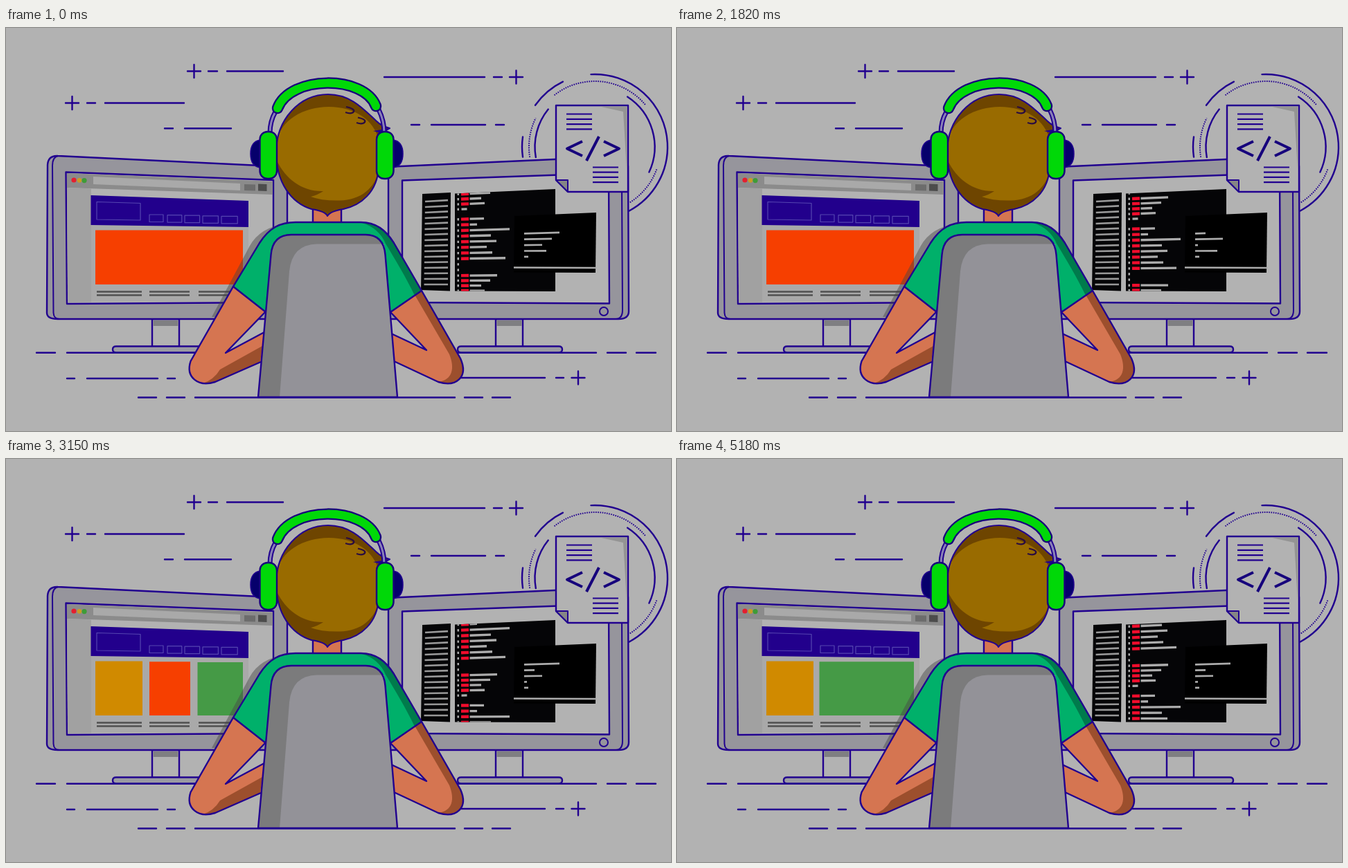
These frames come from a looping animation (960 by 583 pixels, 5240 ms). An HTML page with a canvas:

```html
<!DOCTYPE html>
<html lang="en">
<head>
<meta charset="utf-8">
<title>Programmer at work</title>
<style>
html, body { margin: 0; width: 100%; height: 100%; overflow: hidden; background: #b2b2b2; }
canvas { display: block; }
</style>
</head>
<body>
<canvas id="stage" width="960" height="583"></canvas>
<script>
const ctx = document.getElementById('stage').getContext('2d');
const INK = '#21008f', BG = '#b2b2b2', METAL = '#96959c', TEXT = '#acacac';
const SKIN = '#d57551', TAN = '#9c4f2d', SHIRT = '#00b06a', LIME = '#00d808';
const AMBER = '#d08a00', ORANGE = '#f63f00', GREEN = '#459a46';

function draw(d, fill, line, width = 2.4) {
  const path = new Path2D(d);
  if (fill) { ctx.fillStyle = fill; ctx.fill(path); }
  if (line) { ctx.strokeStyle = line; ctx.lineWidth = width; ctx.stroke(path); }
}

// Horizontal dashes given as start and end pairs.
function dashes(y, ...xs) {
  let d = '';
  for (let i = 0; i < xs.length; i += 2) d += `M${xs[i]},${y}H${xs[i + 1]}`;
  draw(d, null, INK);
}
const plus = (x, y) => draw(`M${x - 9.5},${y}h19M${x},${y - 9.5}v19`, null, INK);

function disc(x, y, r, fill, line) {
  ctx.beginPath();
  ctx.arc(x, y, r, 0, 7);
  if (fill) { ctx.fillStyle = fill; ctx.fill(); }
  if (line) { ctx.strokeStyle = line; ctx.lineWidth = 2; ctx.stroke(); }
}

function ring(r, from, to, dotted) {
  ctx.beginPath();
  ctx.arc(850, 172, r, from * Math.PI / 180, to * Math.PI / 180);
  ctx.setLineDash(dotted ? [1.6, 1.6] : []);
  ctx.lineCap = dotted ? 'butt' : 'round';
  ctx.strokeStyle = INK;
  ctx.lineWidth = dotted ? 2 : 2.4;
  ctx.stroke();
  ctx.setLineDash([]);
  ctx.lineCap = 'round';
}

function scenery() {
  dashes(62.5, 292, 305, 319, 400);
  dashes(108.5, 117, 129, 143, 257);
  dashes(145.3, 229, 241, 258, 325);
  dashes(71, 546, 691, 704, 716);
  dashes(140, 585, 597, 614, 692, 707, 719);
  dashes(469.7, 44, 71, 88, 290, 640, 852, 868, 895, 910, 938);
  dashes(507, 88, 99, 117, 219, 233, 244);
  dashes(506, 640, 778, 794, 805);
  dashes(534.5, 191, 217, 232, 258, 273, 648, 662, 688, 702, 728);
  plus(271.5, 62.5); plus(95.5, 108.5); plus(736.5, 71); plus(826, 506);
  ring(105, -93, 62);
  ring(105, 215, 244);
  ring(105, 172, 188);
  ring(95, 232, 320, true);
  ring(95, 171, 206, true);
  ring(95, 20, 58, true);
  ring(86.5, -57, 25);
  ring(86.5, 170, 219);
}

function stand(x, left, right) {
  draw(`M${x},421h39v40h-39z`, BG, INK);
  draw(`M${x + 1.5},423h36v8h-36z`, '#7f7f82');
  draw(`M${left + 5},460.5H${right - 5}q5,0 5,4.5t-5,4.5H${left + 5}q-5,0 -5,-4.5t5,-4.5z`, '#9b9ba3', INK);
}

function webPage(phase) {
  draw('M86.5,208.5L386,220V397L88,399z', BG, INK);
  draw('M88,210L385,222V241L88,231z', '#8b8b8b');
  draw('M88,231L123,232.5V396.5L89,397z', '#a1a1a1');
  draw('M126,215L338,225V235L126,226z', '#a9a9a9');
  draw('M344,226l16,.6v9l-16,-.6z', '#6c6c6c');
  draw('M364,225.5l12.5,.6v10l-12.5,-.6z', '#4c4c4c');
  disc(98, 220, 3.6, '#e51f2f');
  disc(106, 220.3, 3.4, '#c99b28');
  disc(113, 220.6, 3.6, '#3f9c38');
  draw('M123,242L350,250V396H123z', '#a9a9a9');

  const maroon = phase === 5 || phase === 6;
  const edge = maroon ? '#b4386f' : '#5546b0';
  draw('M122.5,242L350,250V288L122.5,285z', maroon ? '#860036' : '#22008c');
  draw('M131,251.5L194,253.5V278L131,277z', null, edge, 1.2);
  [207, 233, 258, 284, 311].forEach((x, i) =>
    draw(`M${x},${270 + i * .6}h${20 + i * .8}v10.5h${-20 - i * .8}z`, null, edge, 1.2));

  const block = (x, right, fill) => draw(`M${x},${291.2 + x / 100}H${right}V371H${x}z`, fill);
  if (phase > 6 || phase < 1) block(129, 342, ORANGE);
  else {
    block(129, 197, AMBER);
    if (phase < 4) { block(207, 266, ORANGE); block(276.5, 342, GREEN); }
    else block(205.5, 342, GREEN);
  }
  draw('M131,381.5h65M131,386.5h65M207,381.5h58M207,386.5h58M278,381.5h55M278,386.5h55', null, '#505050', 2.3);
}

// Right edge of each code line; 0 is a lone bracket, -1 empty, 1 only a gutter mark.
const CODE = [709, 699, 686, 691, 0, -1, 690, 680, 727, 700, 708, 694, 702, 721, 1, 1];

function bar(x, right, y, tilt, colour, width = 3.3) {
  draw(`M${x},${y + (x - 676) * tilt}L${right},${y + (right - 676) * tilt}`, null, colour, width);
}

function editor(phase) {
  draw('M601,240L642,238L641,380.5L599,379z', '#050507');
  for (let i = 0; i < 16; i++) {
    const y = 251 + i * 8;
    draw(`M${605 - i * .1},${y}L638,${y - 1.8 + i * .12}`, null, '#989898', 2.7);
  }
  const panel = 'M648,239.5L793,233V381L648,380.5z';
  draw(panel, '#050507');
  ctx.save();
  ctx.clip(new Path2D(panel));
  const scroll = Math.min(15.2 * phase, 13.1 * phase + 7);
  for (let k = -1; k < 2; k++) CODE.forEach((end, i) => {
    const y = 358 - scroll + 126 * k + (i < 6 ? 7.35 * i : 44 + 8.2 * (i - 6));
    if (y < 230 || y > 386 || end < 0) return;
    const tilt = -.045 * (380 - y) / 140;
    bar(651.5, 654, y, tilt, TEXT);
    if (end === 0) bar(657.5, 665.5, y, tilt, TEXT);
    if (end > 1) {
      bar(657, 668, y, tilt, '#f00c2c', 4.4);
      bar(669.5, end, y, tilt, TEXT);
    }
  });
  ctx.restore();
}

function terminal(phase) {
  draw('M734,272L852,267L851,354L733,353.5z', '#000');
  draw('M733,346.5L851,347', null, TEXT, 2.4);
  const ends = [799, 788, 774, 780, 754];
  if (phase > 1 && phase < 5) { ends[1] = 763; ends[3] = 752; }
  if (phase > 6) { ends[0] = 763; ends[2] = 752; }
  ends.forEach((end, i) => {
    const y = 297.3 + i * 8.4, slope = (4 - i) * .007;
    draw(`M748,${y}L${end},${y - (end - 748) * slope}`, null, TEXT, 2.7);
  });
}

function monitors(phase) {
  stand(211, 154, 300);
  stand(707, 652, 803);
  ctx.lineCap = 'butt';
  draw('M75,185L398,200.5Q406,201 406,210V421H75Q59,421 59,412L60,198Q61,184 75,185z', METAL, INK);
  draw('M75,185Q67,187 67,199L68.5,412Q69,421 77,421', null, INK, 2);
  draw('M552,212Q552,201 560,200.5L880,186Q898,186 898,200L899,410Q899,421 884,421H552z', METAL, INK);
  draw('M889,230L890,408Q890,421 880,421', null, INK, 2);
  webPage(phase);
  draw('M572,220.5L870,210L871,398.5L572,397z', BG, INK);
  editor(phase);
  terminal(phase);
  disc(863, 410, 6, null, INK);
  // Shadow cast by the body
  draw('M405,283Q367,288 352,315L297,418H320L400,310z', 'rgba(70,70,70,.45)');
}

function codeSheet() {
  draw('M794,112H898V237H811L794,220z', BG, INK);
  draw('M857,113.5H896.5V212L891,121z', '#949494');
  draw('M794,220H811V237z', '#858585', INK, 2);
  for (let i = 0; i < 4; i++) {
    draw(`M809,${124.5 + i * 7.3}h37M847,${201.5 + i * 7.2}h37`, null, INK, 2.2);
  }
  draw('M832,164L810,174.5L832,185M856,157L838,192M863,164L885,174.5L863,185', null, '#16007c', 4);
}

function body() {
  draw('M328,374L266.5,482C259,505 277,520 302,512L368,483L373,440L317,470L376,409z', SKIN);
  draw('M370,460L367,483L302,512Q290,516 284,514Q300,509 309,494z', TAN);
  draw('M328,374L266.5,482C259,505 277,520 302,512L368,483M373,440L317,470L376,409', null, INK);
  draw('M600,380L656,478C668,505 650,520 624,512L560,482L556,442L607,466L554,410z', SKIN);
  draw('M590,386L600,380L656,478C668,505 650,520 624,512C645,509 648,492 640,472z', TAN);
  draw('M600,380L656,478C668,505 650,520 624,512L560,482M556,442L607,466L554,410', null, INK);

  draw('M443,250H484V284H443z', SKIN, INK);
  const shirt = 'M328,374L366,311C380,289 396,281 418,281H512C534,281 548,292 560,311L600,380L555,411L500,330H430L375,411z';
  draw(shirt, SHIRT);
  draw('M514,282C534,282 548,292 560,311L600,380L590,387C578,362 562,335 548,312Q538,289 514,282z', '#007b4c');
  draw(shirt, null, INK);

  const chair = 'M364,534L382.5,328Q385,299 412,299H519Q545,299 547.5,328L565,534z';
  draw(chair, '#7b7b7c');
  draw('M395,534L409,352Q413,313 449,312.5H546L547.5,328L565,534z', '#939298');
  draw(chair, null, INK);
}

function head() {
  draw('M367,162Q353,164 353,182T367,202zM559,162Q573,164 573,182T559,202z', '#06006c', INK, 1.5);
  const hair = 'M390,180C390,132 424,96 465,96C497,96 515,116 534,134Q542,142 554,145L538,153V200C537,238 511,257 487,262Q468,265 464,272Q461,265 441,262C412,253 390,224 390,180z';
  draw(hair, '#6e4500');
  draw('M391,166C395,133 430,114 466,114C504,114 532,134 538,162V202C535,232 511,249 482,249.5Q455,250 440,244Q451,241 458,236C428,237 404,219 391,192z', '#996b00');
  draw(hair, null, INK, 2);
  draw('M530,149L554,145L545,153z', INK);
  draw('M491,114Q504,117 502,121Q499,125 490,122M508,129.5Q520,132 518,136Q515,140 506,137', null, '#2a0c40', 2.2);

  ctx.lineCap = 'round';
  const arms = 'M389,121Q381,135 381,152M538,118Q546,134 546,152';
  draw(arms, null, INK, 7);
  draw(arms, null, '#8980b6', 3);
  const band = 'M392,116C410,68 517,68 534,113';
  draw(band, null, '#17007c', 16.5);
  draw(band, null, LIME, 12);
  for (const x of [366.5, 535]) {
    ctx.beginPath();
    ctx.roundRect(x, 150, 24.5, 68, 11);
    ctx.fillStyle = LIME;
    ctx.fill();
    ctx.strokeStyle = '#17007c';
    ctx.lineWidth = 2.4;
    ctx.stroke();
  }
}

function render() {
  // Poses last 140 and 70 ms in turn; the nine-pose cycle restarts every 5240 ms.
  const t = performance.now() % 5240;
  const step = 2 * Math.floor(t / 210) + (t % 210 >= 140 ? 1 : 0);
  const phase = step % 9;
  ctx.fillStyle = BG;
  ctx.fillRect(0, 0, 960, 583);
  ctx.lineCap = ctx.lineJoin = 'round';
  scenery();
  monitors(phase);
  codeSheet();
  body();
  head();
  requestAnimationFrame(render);
}
render();
</script>
</body>
</html>
```
